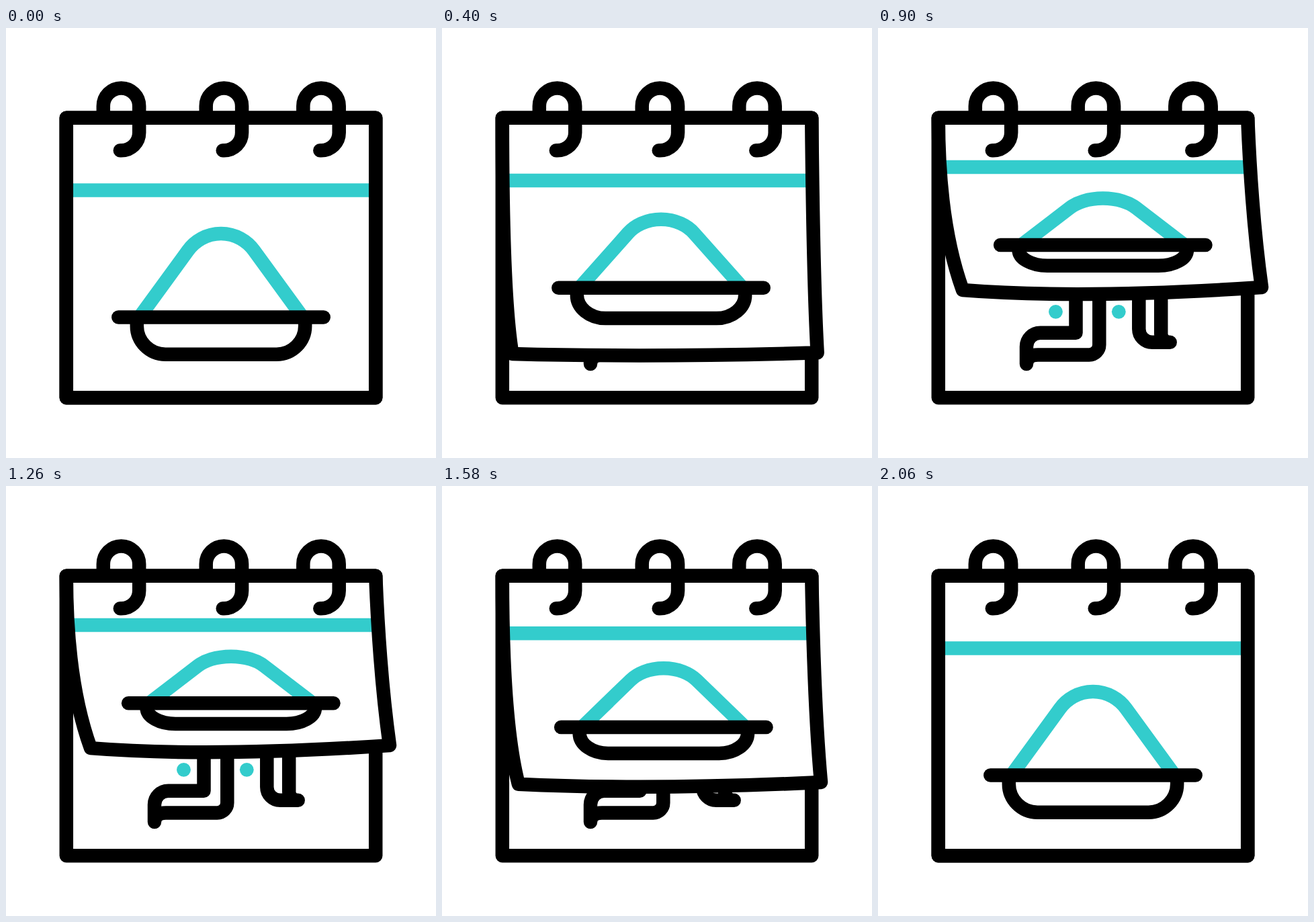
These frames come from a looping animation (640 by 640 pixels, 2800 ms). An HTML page:

```html
<!DOCTYPE html>
<html lang="en">
<head>
<meta charset="utf-8">
<title>Calendar page</title>
<style>
  html, body { margin: 0; width: 100%; height: 100%; overflow: hidden; background: #fff; }
  svg { display: block; width: 100%; height: 100%; }
  path { fill: none; stroke: #000; stroke-width: 20.5; stroke-linejoin: round; }
  .round { stroke-linecap: round; }
  .teal { stroke: #3cc; }
  .dot { fill: #3cc; }
  #sheet { fill: #fff; stroke: none; }
</style>
</head>
<body>
<svg viewBox="0 0 640 640">
  <defs>
    <path id="ring" class="round" d="M144.8 131V116.2a26.7 26.7 0 0 1 53.4 0V155.8a26.4 26.4 0 0 1 -26.4 26.4H169.8"/>
  </defs>

  <!-- next page -->
  <path d="M89.8 133.8H550.2V550.2H89.8Z"/>
  <circle class="dot" cx="264.5" cy="422.3" r="10.4"/>
  <circle class="dot" cx="358.3" cy="422.3" r="10.4"/>
  <path class="round" d="M294.5 380V453.8H241.5A20.5 20.5 0 0 0 221 474.3V500C221 492 228 486.5 238 486.5H314.3A15 15 0 0 0 329.3 471.5V380"/>
  <path class="round" d="M388.3 380V448A19.8 19.8 0 0 0 408.1 467.8H434.7C427 467.8 421.2 463 421.2 455V380"/>

  <!-- lifting page -->
  <path id="sheet"/>
  <path id="rule" class="teal"/>
  <g id="dish">
    <path id="mound" class="teal"/>
    <path id="bowl"/>
    <path class="round" d="M-152.7 0H152.7"/>
  </g>
  <path id="edge"/>

  <use href="#ring"/>
  <use href="#ring" x="152.9"/>
  <use href="#ring" x="297.5"/>
</svg>
<script>
const LOOP = 2800;
const LIFT = { start: 0, length: 885 };
const DROP = { start: 1243, length: 815 };

const get = id => document.getElementById(id);
const [sheet, rule, dish, mound, bowl, edge] =
  ['sheet', 'rule', 'dish', 'mound', 'bowl', 'edge'].map(get);
const setPath = (el, d) => el.setAttribute('d', d);
const mix = (a, b, p) => a + (b - a) * p;

// cubic-bezier(a, 0, 1 - a, 1)
function ease(x, a) {
  if (x <= 0) return 0;
  if (x >= 1) return 1;
  let lo = 0, hi = 1, s;
  for (let i = 0; i < 24; i++) {
    s = (lo + hi) / 2;
    const r = 1 - s;
    const at = 3 * a * s * r * r + 3 * (1 - a) * s * s * r + s ** 3;
    if (at < x) lo = s; else hi = s;
  }
  return s * s * (3 - 2 * s);
}

const phase = (t, { start, length }) => (t - start) / length;
const lift = (t, a) => ease(phase(t, LIFT), a) - ease(phase(t, DROP), a);

function draw(t) {
  const p = lift(t, 0.5);

  const left = [mix(89.8, 126, p), mix(550.2, 390, p)];
  const right = [mix(550.2, 571, p), mix(550.2, 386, p)];
  const sag = (left[1] + right[1]) / 2 + 16 * p;
  const page = `M89.8 133.8H550.2` +
    `Q${mix(550.2, 556, p)} ${mix(440, 278, p)} ${right}` +
    `Q${mix(320, 300, p)} ${sag} ${left}` +
    `Q89.8 ${mix(472, 290, p)} 89.8 133.8Z`;
  setPath(sheet, page);
  setPath(edge, page);

  const y = mix(241.5, 207, lift(t, 0.42));
  setPath(rule, `M${95 + 2 * p} ${y}H${545 + 5 * p}`);

  // the dish flattens towards its rim
  const k = 1 - 0.442 * p;
  dish.setAttribute('transform', `translate(${320 + 14.8 * p} ${mix(430.6, 323.1, p)})`);
  setPath(mound, `M-121.6 0L-49.2 ${-99.3 * k}A60.6 ${60.6 * k} 0 0 1 49.2 ${-99.3 * k}L121.6 0`);
  const r = `42.5 ${42.5 * k} 0 0 0 42.5`;
  setPath(bowl, `M-125.2 0V${12.6 * k}a${r} ${42.5 * k}H82.7a${r} ${-42.5 * k}V0`);
}

const began = performance.now();
function tick() {
  draw((performance.now() - began) % LOOP);
  requestAnimationFrame(tick);
}
draw(0);
requestAnimationFrame(tick);
</script>
</body>
</html>
```
